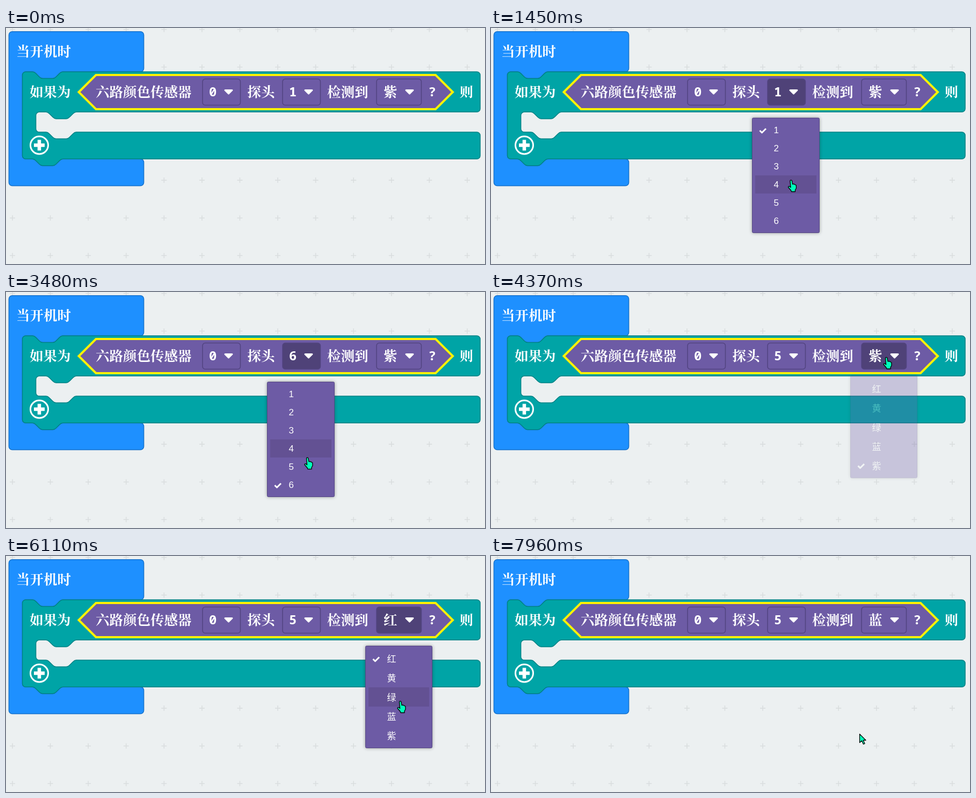
An HTML page that plays this animation: 892 by 442 pixels, repeating every 8000 ms.

```html
<!DOCTYPE html>
<html lang="zh-CN">
<head>
<meta charset="utf-8">
<title>颜色传感器积木</title>
<style>
  html, body { margin: 0; width: 100%; height: 100%; overflow: hidden; background: #ecf0f1; }
  svg { display: block; }
  .block { stroke-width: 1.5; vector-effect: non-scaling-stroke; }
  .label { fill: #fff; font: bold 25.5px "Noto Serif CJK SC", "Noto Serif SC", "Noto Sans CJK SC", "Noto Sans CJK", serif; }
  .code { fill: #fff; font: bold 24px "Noto Sans Mono", "DejaVu Sans Mono", monospace; }
  .item { fill: #fff; font: 17px "Liberation Sans", "Noto Sans CJK SC", "Noto Sans CJK", sans-serif; }
  .menu { filter: drop-shadow(0 0 3px rgba(0, 0, 0, .35)); }
</style>
</head>
<body>
<svg id="stage" width="892" height="442" viewBox="0 0 892 442"></svg>
<script>
const LOOP = 8000, STEP = 40;
const stage = document.getElementById('stage');

function add(parent, tag, attrs, text) {
  const el = document.createElementNS('http://www.w3.org/2000/svg', tag);
  for (const key in attrs) el.setAttribute(key, attrs[key]);
  if (text !== undefined) el.textContent = text;
  parent.append(el);
  return el;
}
const label = (x, y, text, cls = 'label') => add(stage, 'text', { x, y, class: cls }, text);

// Workspace grid
let grid = '';
for (let row = 0; row < 7; row++)
  for (let col = 0; col < 13; col++)
    grid += `M${12 + 70.58 * col - 5} ${2.7 + 70.6 * row}h10m-5 -5v10`;
add(stage, 'path', { d: grid, stroke: '#dadedf', 'stroke-width': 1.6, fill: 'none' });

// Block outlines, in block units
const notch = s => `c${2 * s} 0 ${3 * s} 1 ${4 * s} 2l${4 * s} 4c${s} 1 ${2 * s} 2 ${4 * s} 2h${12 * s}` +
  `c${2 * s} 0 ${3 * s} -1 ${4 * s} -2l${4 * s} -4c${s} -1 ${2 * s} -2 ${4 * s} -2`;
const arc = (x, y, sweep = 1) => `a4 4 0 0 ${sweep} ${x} ${y}`;
const right = (w, top, bottom) => `H${w - 4}${arc(4, 4)}V${bottom - 4}${arc(-4, 4)}`;
const blocks = add(stage, 'g', { transform: 'translate(30.5 82) scale(1.57)' });
const block = (d, fill, stroke) => add(blocks, 'path', { d, fill, stroke, class: 'block' });

block(`M-16 -44${arc(4, -4)}${right(144, -48, 0)}H48${notch(-1)}H4${arc(-4, 4, 0)}V100${arc(4, 4, 0)}` +
  `H12${notch(1)}${right(144, 104, 136)}H-12${arc(-4, -4)}Z`, '#1e90ff', '#1873cc');
block(`M0 4${arc(4, -4)}H12${notch(1)}${right(543, 0, 48)}H64${notch(-1)}H20${arc(-4, 4, 0)}V68${arc(4, 4, 0)}` +
  `H28${notch(1)}${right(543, 72, 104)}H48${notch(-1)}H4${arc(-4, -4)}Z`, '#00a4a6', '#008385');

add(stage, 'path', {
  d: 'M135.5 120L167.5 88H800L832 120 800 152H167.5Z',
  fill: '#6d5ba5', stroke: '#fff200', 'stroke-width': 4
});
add(stage, 'circle', { cx: 62, cy: 219.5, r: 16.5, fill: 'none', stroke: '#fff', 'stroke-width': 3 });
add(stage, 'path', { d: 'M52 219.5h20M62 209.5v20', stroke: '#fff', 'stroke-width': 6.5 });

label(19, 53, '当开机时');
label(44, 128.5, '如果为');
label(167, 128.5, '六路颜色传感器');
label(449.5, 128.5, '探头');
label(598, 128.5, '检测到');
label(844.5, 128.5, '则');
label(786.5, 128, '?', 'code');

// Dropdown fields
function field(x, width, value, cls) {
  const box = add(stage, 'rect', { x, y: 95.5, width, height: 49, rx: 5, stroke: '#524480', 'stroke-width': 1.5 });
  const text = label(x + (cls === 'label' ? 13 : 12), cls === 'label' ? 128.5 : 128, value, cls);
  add(stage, 'path', {
    d: `M${x + width - 28.5} 116.5h13l-6.5 6.5z`,
    fill: '#fff', stroke: '#fff', 'stroke-width': 3, 'stroke-linejoin': 'round'
  });
  return { box, text };
}
const paint = (f, open) => f.box.setAttribute('fill', open ? '#4f4278' : '#6d5ba5');
paint(field(366, 70.5, '0', 'code'), false);

// Menus
function menu(x, width, rowHeight, items, baseline) {
  const g = add(stage, 'g', { class: 'menu' });
  add(g, 'rect', {
    x: x + .5, y: 168.5, width, height: rowHeight * items.length + 11,
    rx: 2, fill: '#6d5ba5', stroke: '#564884'
  });
  const hover = add(g, 'rect', { x: x + 6, width: width - 11, height: rowHeight, fill: '#635193' });
  items.forEach((item, i) => add(g, 'text', { x: x + 40.5, y: baseline + rowHeight * i, class: 'item' }, item));
  const check = add(g, 'path', {
    d: 'M14.5 .5l4 4 7.5 -7.5', fill: 'none', stroke: '#fff', 'stroke-width': 3, 'stroke-linejoin': 'round'
  });
  return { g, hover, check, x, width, rowHeight, items };
}

const probe = { ...field(515, 70.5, '1', 'code'), initial: '1' };
const color = { ...field(690, 83.5, '紫', 'label'), initial: '紫' };
probe.menu = menu(486, 125, 34, ['1', '2', '3', '4', '5', '6'], 197.3);
color.menu = menu(669, 124, 36, ['红', '黄', '绿', '蓝', '紫'], 199.3);

// open, shown, picked, gone, chosen value
probe.picks = [[1010, 1250, 2630, 2870, '6'], [3200, 3440, 3680, 3920, '5']];
color.picks = [[4330, 4570, 5170, 5290, '红'], [5580, 5820, 6150, 6390, '绿'], [6680, 6920, 7760, 7920, '蓝']];

// Pointer moves: start, end, x, y
const moves = [
  [0, 0, 312, 470], [80, 360, 527, 167.5], [730, 890, 547, 122], [1090, 1450, 558.5, 284.5],
  [1490, 1530, 558.5, 289], [1570, 1890, 551, 367], [2140, 2220, 550, 363], [2380, 2380, 549, 361.5],
  [2630, 2910, 551, 122], [3240, 3480, 561, 309.7], [3520, 3520, 560, 317], [3680, 4000, 736, 122],
  [4490, 4930, 740.5, 198.5], [5050, 5050, 740, 197], [5170, 5290, 738, 122], [5620, 5860, 735, 269],
  [6110, 6110, 734, 271.5], [6190, 6430, 740, 122], [6720, 6960, 739, 322],
  [7160, 7560, 737, 299], [7760, 7960, 686.5, 333.5]
];

const pointer = style => add(stage, 'path', { fill: '#00ffbc', stroke: '#000', 'stroke-width': 1.3, 'stroke-linejoin': 'round', ...style });
const arrow = pointer({ d: 'M0 0V16L4 12.5 7 19 9.5 18 6.7 11.5H11.5Z' });
const hand = pointer({
  d: 'M-1.5 2C-1.5 0 1.5 -.2 2 2L3 8 5 7.7 7.5 8.7 9.8 10 10 15.5 8 19V22H1L0 19.5 -4.8 14C-5.5 12 -3 11.5 -2 12.5L-.4 14Z'
});

// Stepped progress: first change at a, arrival at b
function progress(t, a, b) {
  if (t < a) return 0;
  return Math.min(1, (Math.floor((t - a) / STEP) + 1) / ((b - a) / STEP + 1));
}
const smooth = u => u * u * (3 - 2 * u);

function pointerAt(t) {
  let [, , x, y] = moves[0];
  for (const [a, b, toX, toY] of moves.slice(1)) {
    const u = smooth(progress(t, a, b));
    x += (toX - x) * u;
    y += (toY - y) * u;
  }
  return { x, y };
}

function updateField(f, t, p) {
  let value = f.initial, alpha = 0, open = false;
  for (const [start, shown, picked, gone, choice] of f.picks) {
    if (t >= start && t < gone) alpha = progress(t, start, shown) - progress(t, picked, gone);
    if (t >= start && t < picked) open = true;
    if (t >= picked) value = choice;
  }
  paint(f, open);
  f.text.textContent = value;

  const m = f.menu;
  m.g.style.display = alpha > 0 ? '' : 'none';
  m.g.style.opacity = alpha;
  m.g.setAttribute('transform', `translate(0 ${-16 * (1 - alpha)})`);
  const top = 174, row = Math.floor((p.y - top) / m.rowHeight);
  const inside = alpha > 0 && p.x > m.x && p.x < m.x + m.width && row >= 0 && row < m.items.length;
  m.hover.style.display = inside ? '' : 'none';
  m.hover.setAttribute('y', top + row * m.rowHeight);
  m.check.setAttribute('transform',
    `translate(${m.x} ${top + (m.items.indexOf(value) + .5) * m.rowHeight + .5})`);
  return inside;
}

function draw(t) {
  const p = pointerAt(t);
  const overProbe = updateField(probe, t, p);
  const overColor = updateField(color, t, p);
  const pointing = overProbe || overColor || p.y < 158;
  arrow.style.display = pointing ? 'none' : '';
  hand.style.display = pointing ? '' : 'none';
  (pointing ? hand : arrow).setAttribute('transform', `translate(${p.x} ${p.y})`);
}

const begin = performance.now();
function tick() {
  draw((performance.now() - begin) % LOOP);
  requestAnimationFrame(tick);
}
tick();
</script>
</body>
</html>
```
